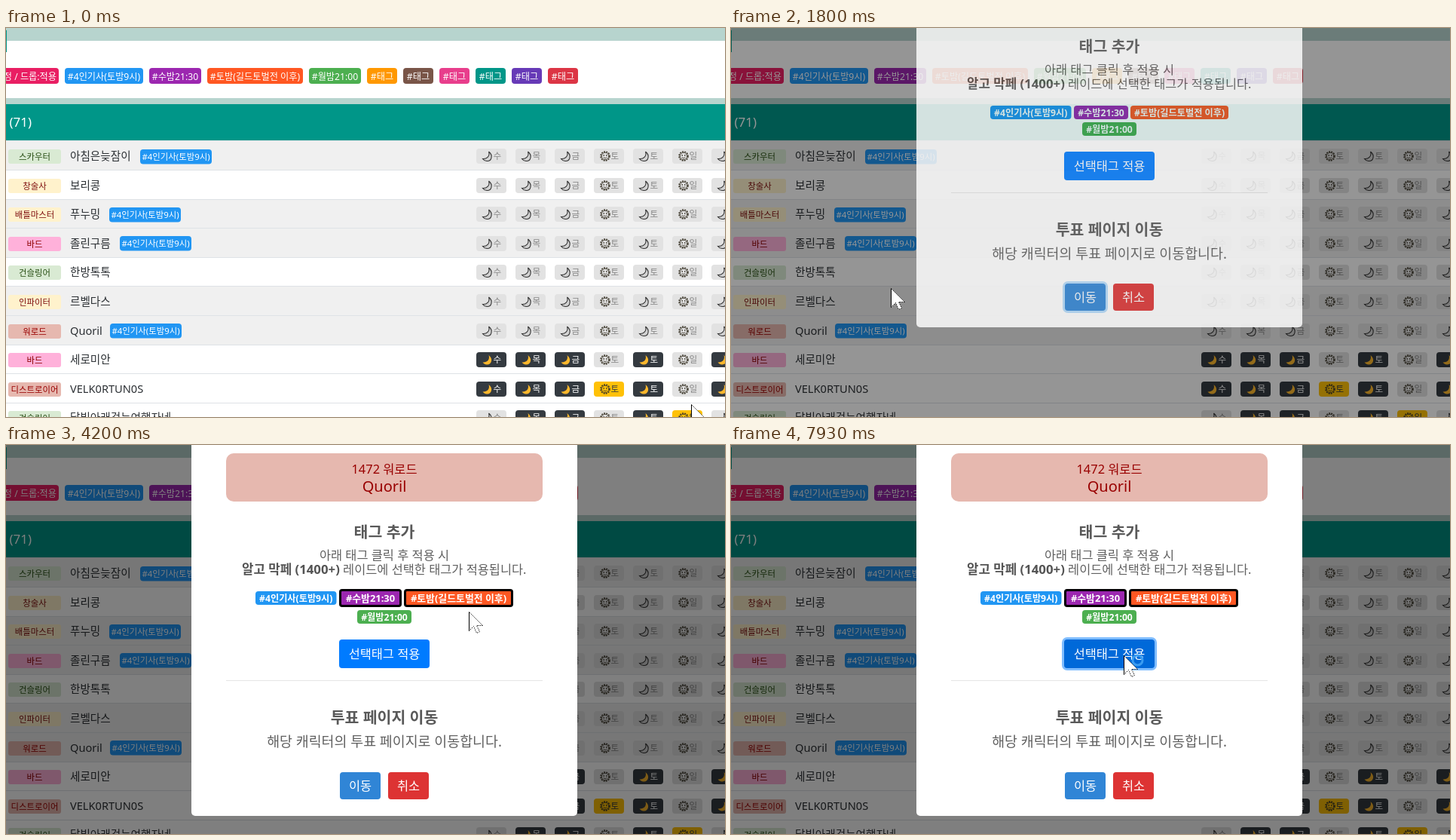
Write an HTML page with a canvas that moves like this. It is 954 by 516 pixels and loops after 8 s.

```html
<!DOCTYPE html>
<html lang="ko">
<head>
<meta charset="utf-8">
<style>
html, body { margin: 0; width: 100%; height: 100%; overflow: hidden; background: #fff; }
canvas { display: block; }
</style>
</head>
<body>
<canvas id="stage" width="954" height="516"></canvas>
<script>
const W = 954, H = 516, LOOP = 8000, STEP = 200 / 3;
const FONT = '"Noto Sans", "Noto Sans CJK KR", sans-serif';
const stage = document.getElementById('stage').getContext('2d');
const layer = document.createElement('canvas');
layer.width = W;
layer.height = H;
const dialog = layer.getContext('2d');
let c = stage;

const BLUE = '#2196f3', PURPLE = '#9c27b0', ORANGE = '#ff5722', GREEN = '#4caf50';
const KNIGHT = '#4인기사(토밤9시)', WED = '#수밤21:30', SAT = '#토밤(길드토벌전 이후)', MON = '#월밤21:00';

// left, width, colour, label
const TOP_TAGS = [
  [-40, 110, '#e91e63', ''], [78, 104, BLUE, KNIGHT], [190, 69, PURPLE, WED],
  [267, 127, ORANGE, SAT], [402, 69, GREEN, MON],
  ...['#ff9800', '#795548', '#e83e8c', '#009688', '#673ab7', '#dc3545']
    .map((color, i) => [479 + 48 * i, 40, color, '#태그'])
];

const JOB = {
  green: ['#d9ead3', '#274e13'], yellow: ['#fff2cc', '#7f1010'],
  pink: ['#ffb1da', '#8b0000'], red: ['#e6b8af', '#990000']
};
// job, job colour, name, shaded row, tag position, chosen days
const ROWS = [
  ['스카우터', 'green', '아침은늦잠이', 1, 178, ''],
  ['창술사', 'yellow', '보리콩', 0, 0, ''],
  ['배틀마스터', 'yellow', '푸누밍', 1, 137, ''],
  ['바드', 'pink', '졸린구름', 1, 151, ''],
  ['건슬링어', 'green', '한방톡톡', 0, 0, ''],
  ['인파이터', 'yellow', '르벨다스', 1, 0, ''],
  ['워로드', 'red', 'Quoril', 1, 138, ''],
  ['바드', 'pink', '세로미안', 0, 0, '01246'],
  ['디스트로이어', 'red', 'VELK0RTUN0S', 0, 0, '012346'],
  ['건슬링어', 'green', '달빛아래걷는여행자네', 0, 0, '1245']
];
const DAYS = '수목금토토일월';

// time, x, y
const PATH = [
  [0, 910, 500], [867, 157, 398], [1067, 111, 396], [1667, 111, 396],
  [2000, 404, 254], [2133, 419, 209], [2467, 419, 209], [2667, 487, 209],
  [2800, 487, 209], [3000, 421, 208], [3200, 421, 208], [3400, 486, 207],
  [3533, 486, 207], [3800, 600, 207], [4000, 600, 207], [4200, 615, 222],
  [4733, 565, 284], [4800, 565, 284], [5067, 460, 232], [5333, 565, 204],
  [5467, 565, 204], [5800, 524, 281], [5933, 524, 281], [6000, 524, 278],
  [7866, 524, 278], [7933, 522, 280]
];
const OPEN = 1550, OPEN_TIME = 475, DROP = 533;
const PICK_WED = 3400, PICK_SAT = 4000, HOVER = 5660, PRESS = 6000, BUSY = 6130;

function rect(x, y, w, h, color) {
  c.fillStyle = color;
  c.fillRect(x, y, w, h);
}

function box(x, y, w, h, r, color) {
  c.fillStyle = color;
  c.beginPath();
  c.roundRect(x, y, w, h, r);
  c.fill();
}

// y is the optical middle of the line
function text(s, x, y, size, color, align = 'center', weight = 400) {
  c.font = `${weight} ${size}px ${FONT}`;
  c.textAlign = align;
  c.fillStyle = color;
  c.fillText(s, x, y + size * 0.37);
  return c.measureText(s).width;
}

function moon(x, y, on) {
  c.save();
  c.translate(x, y);
  c.beginPath();
  c.moveTo(16.5, -6);
  c.bezierCurveTo(23, -1, 20, 7, 14, 6.5);
  c.bezierCurveTo(11.5, 6.3, 9.5, 5, 8.5, 3.5);
  c.bezierCurveTo(14, 4, 18.5, 0, 16.5, -6);
  c.fillStyle = on ? '#fbb72c' : '#d2d2d2';
  c.fill();
  if (!on) {
    c.strokeStyle = '#333';
    c.lineWidth = 1.1;
    c.stroke();
  }
  c.restore();
}

function ring(x, y, r, width, color, from = 0, to = 2 * Math.PI) {
  c.strokeStyle = color;
  c.lineWidth = width;
  c.beginPath();
  c.arc(x, y, r, from, to);
  c.stroke();
}

function sun(x, y) {
  const ink = '#3a3528';
  c.save();
  c.setLineDash([2, 1.2]);
  ring(x, y, 6, 1.5, ink);
  c.setLineDash([]);
  ring(x, y, 4.7, 0.9, ink);
  rect(x - 2.5, y - 1.8, 1.5, 1.5, ink);
  rect(x + 1, y - 1.8, 1.5, 1.5, ink);
  ring(x, y, 2.6, 0.9, ink, 0.5, 2.6);
  c.restore();
}

function day(i, y, on) {
  const x = 624 + 52 * i, sunny = i === 3 || i === 5;
  const fill = !on ? '#e2e2e2' : sunny ? '#ffc107' : '#343a40';
  const ink = !on ? '#868686' : sunny ? '#343a40' : '#fff';
  box(x, y - 10, 40, 20, 4, fill);
  if (sunny) sun(x + 15, y); else moon(x, y, on);
  text(DAYS[i], x + 22.5, y, 11.6, ink, 'left');
}

function row([job, tone, name, shaded, tagX, days], i) {
  const top = Math.round(149.2 + 38.65 * i), y = Math.round(170 + 38.6 * i);
  rect(0, top, W, 40, shaded ? '#f0f0f0' : '#fff');
  rect(0, top, W, 1, '#dee2e6');
  const [fill, ink] = JOB[tone];
  box(3, y - 9, 70, 19, 3, fill);
  text(job, 38, y + 0.5, 11.4, ink, 'center', 300);
  text(name, 85, y, 14.6, '#2c3034', 'left', 300);
  if (tagX) {
    const tagY = Math.round(160.6 + 38.6 * i);
    box(tagX, tagY, 95, 19.5, 4, BLUE);
    text(KNIGHT, tagX + 47.5, tagY + 9.5, 11.4, '#fff');
  }
  for (let d = 0; d < 7; d++) day(d, y, days.includes(d));
}

function page() {
  rect(0, 0, W, H, '#fff');
  ROWS.forEach(row);
  rect(0, 0, W, 17, '#b7d4ce');
  rect(0, 93, W, 8, '#b7d4ce');
  rect(0, 3, 1, 29, '#009688');
  rect(0, 101, W, 48, '#009688');
  text('(71)', 4.5, 125, 17, '#fff', 'left');
  for (const [x, w, color, label] of TOP_TAGS) {
    box(x, 53, w, 21, 4, color);
    text(label, x + w / 2, 64, 12.2, '#fff');
  }
  text('설정 / 드롭:적용', 67, 64, 12.2, '#fff', 'right');
}

function tag(x, y, w, label, color, picked) {
  if (picked) {
    box(x, y - 12, w, 24, 4, '#000');
    box(x + 3, y - 9, w - 6, 18, 1, color);
  } else {
    box(x, y - 9, w, 18, 4, color);
  }
  text(label, x + w / 2, y, picked ? 12.9 : 12.2, '#fff', 'center', 600);
}

function button(x, y, w, h, label, color, halo) {
  if (halo) box(x - 3, y - 3, w + 6, h + 6, 7, halo);
  box(x, y, w, h, 4, color);
  text(label, x + w / 2, y + h / 2 - 0.5, 16.4, '#fff');
}

function drawDialog(t) {
  const wed = t >= PICK_WED, sat = t >= PICK_SAT;
  const low = wed ? 3 : 0, foot = wed ? 4 : 0;
  const gray = '#606060', mid = 502;
  c.clearRect(0, 0, W, H);
  box(246, -45, 512, DROP + foot, 5, '#fff');
  box(292, 11, 420, 64, 10, '#e6b8af');
  text('1472 워로드', mid, 32, 16.4, '#990000', 'center', 300);
  text('Quoril', mid, 55, 20, '#990000', 'center', 500);
  text('태그 추가', mid, 115, 20.5, '#595959', 'center', 600);
  text('아래 태그 클릭 후 적용 시', mid, 145.5, 16.4, gray, 'center', 300);
  const w = text('알고 막페 (1400+)', 313, 164.5, 16.8, '#545454', 'left', 700);
  text(' 레이드에 선택한 태그가 적용됩니다.', 313 + w, 164.5, 16.4, gray, 'left', 300);

  const line = [
    [107.5, KNIGHT, BLUE, false],
    [wed ? 83 : 72, WED, PURPLE, wed],
    [sat ? 145 : 130, SAT, ORANGE, sat]
  ];
  let x = mid - line.reduce((sum, item) => sum + item[0], 6.5) / 2;
  for (const [width, label, color, picked] of line) {
    tag(Math.round(x), 203, width, label, color, picked);
    x += width + 3.25;
  }
  tag(466, 225 + low, 72, MON, GREEN, false);

  button(442, 255 + low, 120, 38, '선택태그 적용',
    t >= HOVER ? '#0069d9' : '#007bff', t >= PRESS && '#80bdff');
  rect(292, 309 + low, 420, 1, '#e5e5e5');
  text('투표 페이지 이동', mid, 358.5 + low, 20.5, '#595959', 'center', 600);
  text('해당 캐릭터의 투표 페이지로 이동합니다.', mid, 390.5 + low, 18.4, gray, 'center', 300);
  button(443, 430 + foot, 54, 36, '이동', '#3085d6', !wed && '#b5dcfb');
  button(507, 430 + foot, 54, 36, '취소', '#dd3333');
}

// cubic-bezier(.25, .1, .25, 1)
function ease(p) {
  if (p <= 0 || p >= 1) return p <= 0 ? 0 : 1;
  const curve = (a, b, u) => 3 * a * u * (1 - u) ** 2 + 3 * b * u * u * (1 - u) + u ** 3;
  let lo = 0, hi = 1;
  for (let i = 0; i < 24; i++) {
    const u = (lo + hi) / 2;
    if (curve(0.25, 0.25, u) < p) lo = u; else hi = u;
  }
  return curve(0.1, 1, lo);
}

function pointer(t) {
  const i = PATH.findIndex(k => k[0] > t);
  if (i < 0) return PATH[PATH.length - 1].slice(1);
  const [t0, x0, y0] = PATH[i - 1], [t1, x1, y1] = PATH[i];
  const p = (1 - Math.cos(Math.PI * (t - t0) / (t1 - t0))) / 2;
  return [Math.round(x0 + (x1 - x0) * p), Math.round(y0 + (y1 - y0) * p)];
}

function drawPointer(t) {
  const [x, y] = pointer(t);
  if (t >= BUSY) ring(x + 17.5, y + 5.5, 6.5, 3, '#3b9cf0');
  c.save();
  c.translate(x - 0.5, y - 0.5);
  c.beginPath();
  c.moveTo(0, 25);
  for (const [px, py] of [[0, 0], [18, 18], [10, 18], [14, 26], [10, 28], [6, 19]]) c.lineTo(px, py);
  c.closePath();
  c.fillStyle = '#fff';
  c.fill();
  c.strokeStyle = '#000';
  c.lineWidth = 1;
  c.setLineDash([1.4, 1.4]);
  c.stroke();
  c.setLineDash([]);
  c.beginPath();
  c.moveTo(0, 0);
  c.lineTo(0, 25);
  c.stroke();
  c.restore();
}

function draw(t) {
  c = stage;
  page();
  const shown = ease((t - OPEN) / OPEN_TIME);
  if (shown > 0) {
    rect(0, 0, W, H, `rgba(0, 0, 0, ${0.5 * shown})`);
    c = dialog;
    drawDialog(t);
    c = stage;
    c.globalAlpha = shown;
    c.drawImage(layer, 0, Math.round(-DROP * (1 - shown)));
    c.globalAlpha = 1;
  }
  drawPointer(t);
}

const start = performance.now();
function tick() {
  const t = (performance.now() - start) % LOOP;
  draw(Math.floor((t + 5) / STEP) * STEP + 1);
  requestAnimationFrame(tick);
}
tick();
</script>
</body>
</html>
```
